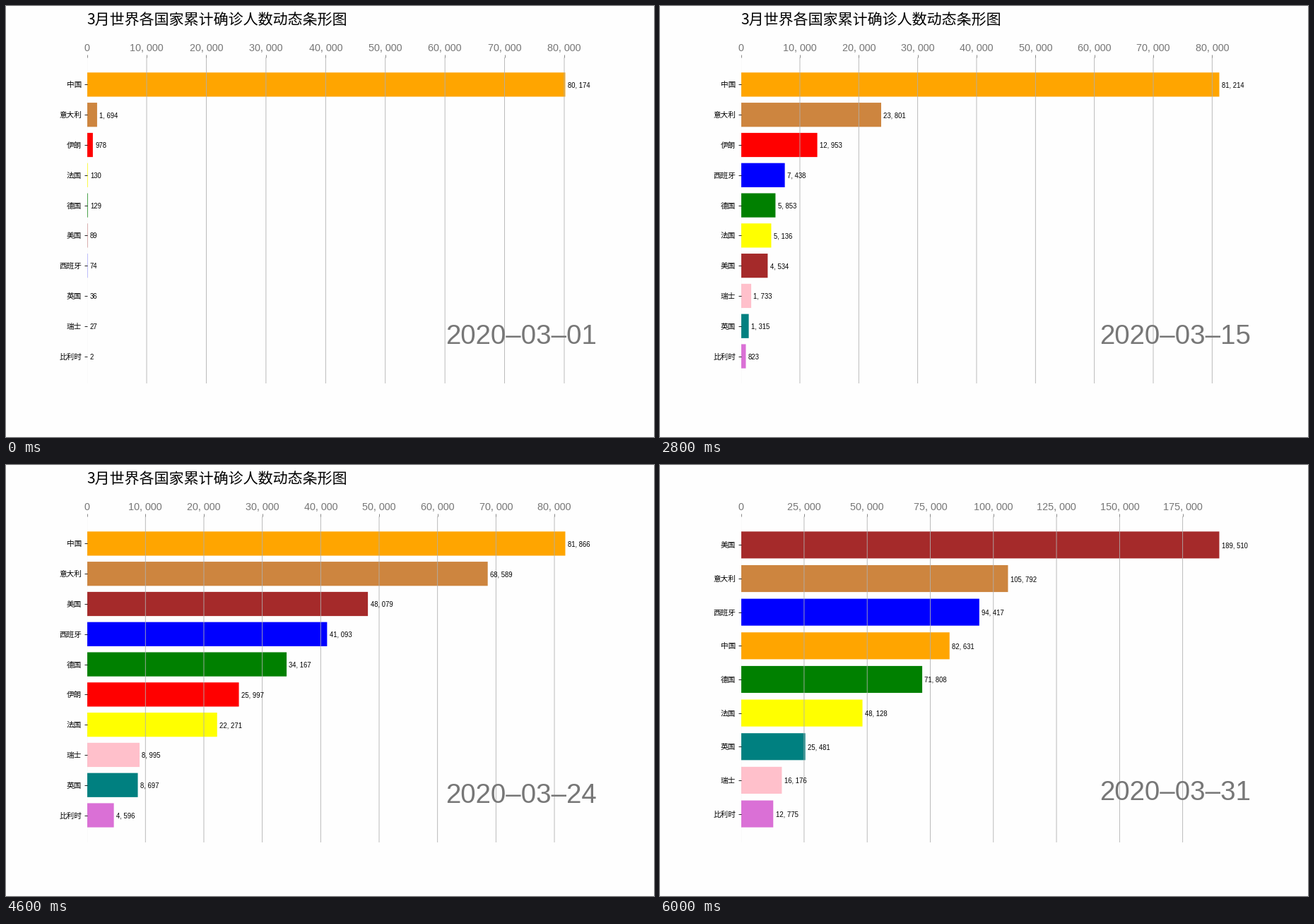
Animation, 917 px wide and 611 px high, one loop 6200 ms. Source, as a matplotlib script:

```python
import numpy as np
import matplotlib.pyplot as plt
from matplotlib.animation import FuncAnimation
from matplotlib.ticker import FuncFormatter

W, H, DPI = 917, 611, 76.4
GREY = "#777777"
DIGITS = "Liberation Sans"
LAST_DAY = 31

plt.rcParams["font.family"] = "Noto Sans CJK JP"
plt.rcParams["path.snap"] = False  # keep sub-pixel bar ends and grid lines

# Key counts per country; a growth rule fills the days between.
KEY_DAYS = [1, 5, 11, 21, 27, 31]
COUNTRIES = {
    "中国": ("orange", 80174, 80710, 80992, 81498, 82213, 82631),
    "意大利": ("peru", 1694, 3927, 12598, 53578, 86498, 105792),
    "伊朗": ("red", 978, 3513, 9000, 20610, 32332, 44605),
    "法国": ("yellow", 130, 423, 2281, 14459, 33414, 48128),
    "德国": ("green", 129, 565, 2046, 22364, 50871, 71808),
    "美国": ("brown", 89, 232, 1312, 22043, 100014, 189510),
    "西班牙": ("blue", 74, 208, 2882, 24926, 65719, 94417),
    "英国": ("teal", 36, 116, 460, 5018, 14579, 25481),
    "瑞士": ("pink", 27, 111, 645, 6113, 12928, 16176),
    "比利时": ("orchid", 2, 50, 314, 2815, 7284, 12775),
}


def count_on(day, keys):
    """Exponential growth that slows with the square root of time."""
    log_n = np.interp(np.sqrt(day), np.sqrt(KEY_DAYS), np.log(keys))
    return round(float(np.exp(log_n)))


def ranking(day):
    """Rows of (count, name, colour), smallest first."""
    rows = [(count_on(day, keys), name, color)
            for name, (color, *keys) in COUNTRIES.items()
            if not (name == "伊朗" and day == LAST_DAY)]
    return sorted(rows)


def grouped(n, pos=None):
    """Thousands with a comma as wide as a digit."""
    return f"{n:,.0f}".replace(",", ", ")


fig = plt.figure(figsize=(W / DPI, H / DPI), dpi=DPI, facecolor="#fefefe")
ax = fig.add_axes([0.125, 0.125, 0.775, 0.755])


def draw(i):
    day = i + 1
    counts, names, colors = zip(*ranking(day))
    top = max(counts)

    ax.clear()
    ax.set_frame_on(False)
    ax.barh(range(len(counts)), counts, color=colors)
    ax.set_yticks(range(len(names)), names, fontsize=10)

    ax.xaxis.set_major_formatter(FuncFormatter(grouped))
    ax.xaxis.set_ticks_position("top")
    ax.tick_params(axis="x", colors=GREY, labelsize=13.5, pad=2.5,
                   labelfontfamily=DIGITS)
    ax.grid(axis="x", color="#b0b0b0", linewidth=0.8)

    for y, n in enumerate(counts):
        ax.text(n + top / 200, y, grouped(n), size=9, family=DIGITS,
                va="center_baseline")

    # Title and date sit in row units, so they shift with the row count.
    ax.text(0, 10.98, "3月世界各国家累计确诊人数动态条形图", size=19.8)
    ax.text(0.7146, 0.41, f"2020–03–{day:02d}", size=36.3, color=GREY,
            family=DIGITS, transform=ax.get_yaxis_transform())
    return []


anim = FuncAnimation(fig, draw, frames=LAST_DAY, init_func=lambda: [],
                     interval=200, repeat=True, repeat_delay=0)
plt.show()
```
